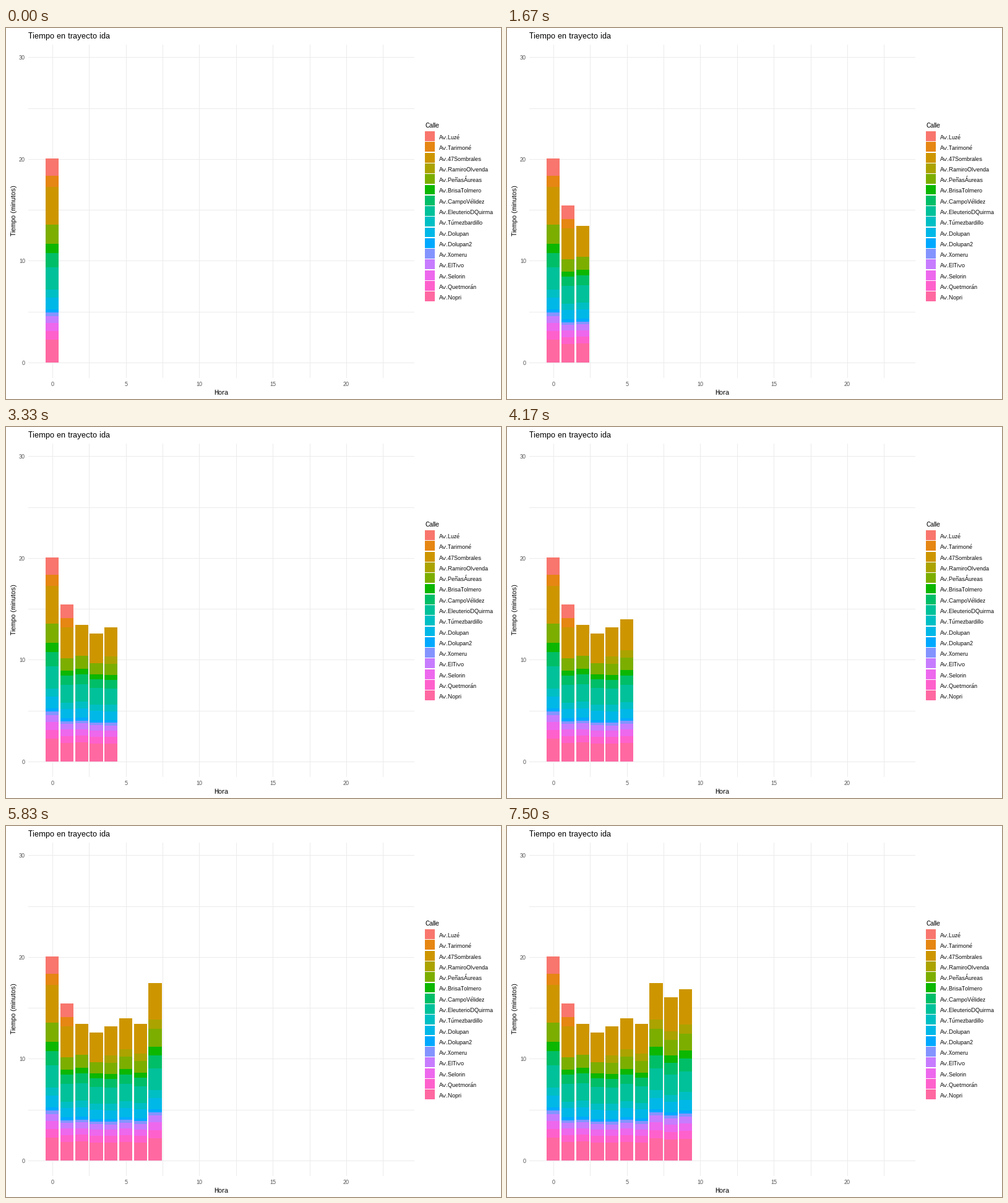
Recreate the animation shown at these times as a matplotlib script. Size 800 by 600 pixels, loop 8000 ms.

```python
import math

import numpy as np
import matplotlib.pyplot as plt
from matplotlib.animation import FuncAnimation
from matplotlib.patches import Rectangle

W, H, DPI = 800, 600, 100
LOOP, STEP = 8000, 20
HOUR_MS = 2500 / 3

# Whole-pixel glyphs without kerning.
plt.rcParams.update({"font.family": "Liberation Sans", "text.hinting": "native",
                     "text.hinting_factor": 1, "text.kerning_factor": 6})

# Street and its usual travel time in minutes, top of the stack first.
STREETS = [
    ("Av.Luzé", 1.34), ("Av.Tarimoné", 0.91), ("Av.47Sombrales", 2.98),
    ("Av.RamiroOlvenda", 0.73), ("Av.PeñasÁureas", 1.21),
    ("Av.BrisaTolmero", 0.52), ("Av.CampoVélidez", 0.91),
    ("Av.EleuterioDQuirma", 1.70), ("Av.Túmezbardillo", 0.64),
    ("Av.Dolupan", 0.91), ("Av.Dolupan2", 0.27), ("Av.Xomeru", 0.27),
    ("Av.ElTivo", 0.55), ("Av.Selorin", 0.64), ("Av.Quetmorán", 0.67),
    ("Av.Nopri", 1.82),
]
TOTALS = [20.04, 15.43, 13.42, 12.57, 13.18, 13.97, 13.42, 17.43, 16.03, 16.82]

X0, HOUR_W = 74.66, 23.77
Y0, MINUTE_H = 541.0, 16.454
GRID, TICK = "#EBEBEB", "#4D4D4D"

fig = plt.figure(figsize=(W / DPI, H / DPI), dpi=DPI, facecolor="white")
ax = fig.add_axes([0, 0, 1, 1])
ax.set_xlim(0, W)
ax.set_ylim(H, 0)
ax.axis("off")


def hcl(hue, chroma=100, lum=65):
    """Polar CIE-LUV colour as clipped sRGB."""
    a = math.radians(hue)
    u = chroma * math.cos(a) / (13 * lum) + 0.19784
    v = chroma * math.sin(a) / (13 * lum) + 0.46834
    y = ((lum + 16) / 116) ** 3
    x = 9 * y * u / (4 * v)
    z = 3 * y / v - 5 * y - x / 3
    rgb = np.array([3.24048 * x - 1.53715 * y - 0.49854 * z,
                    -0.96926 * x + 1.87599 * y + 0.04156 * z,
                    0.05565 * x - 0.20404 * y + 1.05731 * z])
    rgb = np.clip(rgb, 0, 1)
    return tuple(np.where(rgb > 0.00304, 1.055 * rgb ** (1 / 2.4) - 0.055,
                          12.92 * rgb).clip(0, 1))


COLORS = [hcl(15 + 360 * i / len(STREETS)) for i in range(len(STREETS))]


def x_at(hour):
    return round(X0 + HOUR_W * hour)


def y_at(minute):
    return round(Y0 - MINUTE_H * minute)


def box(x0, y0, x1, y1, color, z=2):
    return ax.add_patch(Rectangle((x0, y0), x1 - x0, y1 - y0, fc=color,
                                  lw=0, antialiased=False, zorder=z))


def label(x, y, text, px, color="black", ha="left", **kw):
    ax.text(x, y, text, fontsize=px * 72 / DPI, color=color, ha=ha,
            va="baseline", **kw)


def draw_panel():
    for hour in np.arange(0, 25, 2.5):
        x = x_at(hour)
        box(x, 27, x + 1, 566, GRID, 1)
        if hour % 5 == 0:
            label(x, 579, f"{hour:.0f}", 9, TICK, "center")
    for minute in range(0, 31, 5):
        y = y_at(minute)
        box(36, y, 660, y + 1, GRID, 1)
        if minute % 10 == 0:
            label(31, y + 4, str(minute), 9, TICK, "right")
    label(35.5, 17, "Tiempo en trayecto ida", 13)
    label(347.5, 593, "Hora", 11, ha="center")
    label(16, 295, "Tiempo (minutos)", 11, ha="center", rotation=90,
          rotation_mode="anchor")


def draw_legend():
    label(677, 161, "Calle", 11)
    for i, (name, _) in enumerate(STREETS):
        y = 167.12 + 17.28 * i
        box(677, round(y), 693, round(y + 15.84), COLORS[i])
        label(700, round(y + 12.88), name, 9)


def on_route(i, hour):
    """The first two streets are left early; the fourth joins later."""
    if i < 2:
        return hour < 2
    return i != 3 or hour > 3


def draw_bar(hour, total):
    used = np.array([i for i in range(len(STREETS)) if on_route(i, hour)])
    usual = np.array([STREETS[i][1] for i in used])
    # Traffic slows every street, most of all those around the sixth.
    delay = usual * (0.2 + 0.45 * np.exp(-((used - 5) / 1.3) ** 2))
    load = (total - usual.sum()) / delay.sum()
    tops = total - np.cumsum(usual + load * delay)
    edges = [y_at(m) for m in (total, *tops)]
    left, right = x_at(hour - 0.45), x_at(hour + 0.45)
    return [box(left, top, right, bottom, COLORS[i])
            for i, top, bottom in zip(used, edges, edges[1:])]


draw_panel()
draw_legend()
bars = [draw_bar(hour, total) for hour, total in enumerate(TOTALS)]


def update(n):
    t = (n + 0.5) * STEP
    last = int((t + 5) / HOUR_MS)
    for hour, parts in enumerate(bars):
        for part in parts:
            part.set_visible(hour <= last)
    return []


anim = FuncAnimation(fig, update, frames=LOOP // STEP, interval=STEP,
                     init_func=lambda: update(0), repeat=True, repeat_delay=0)
plt.show()
```
